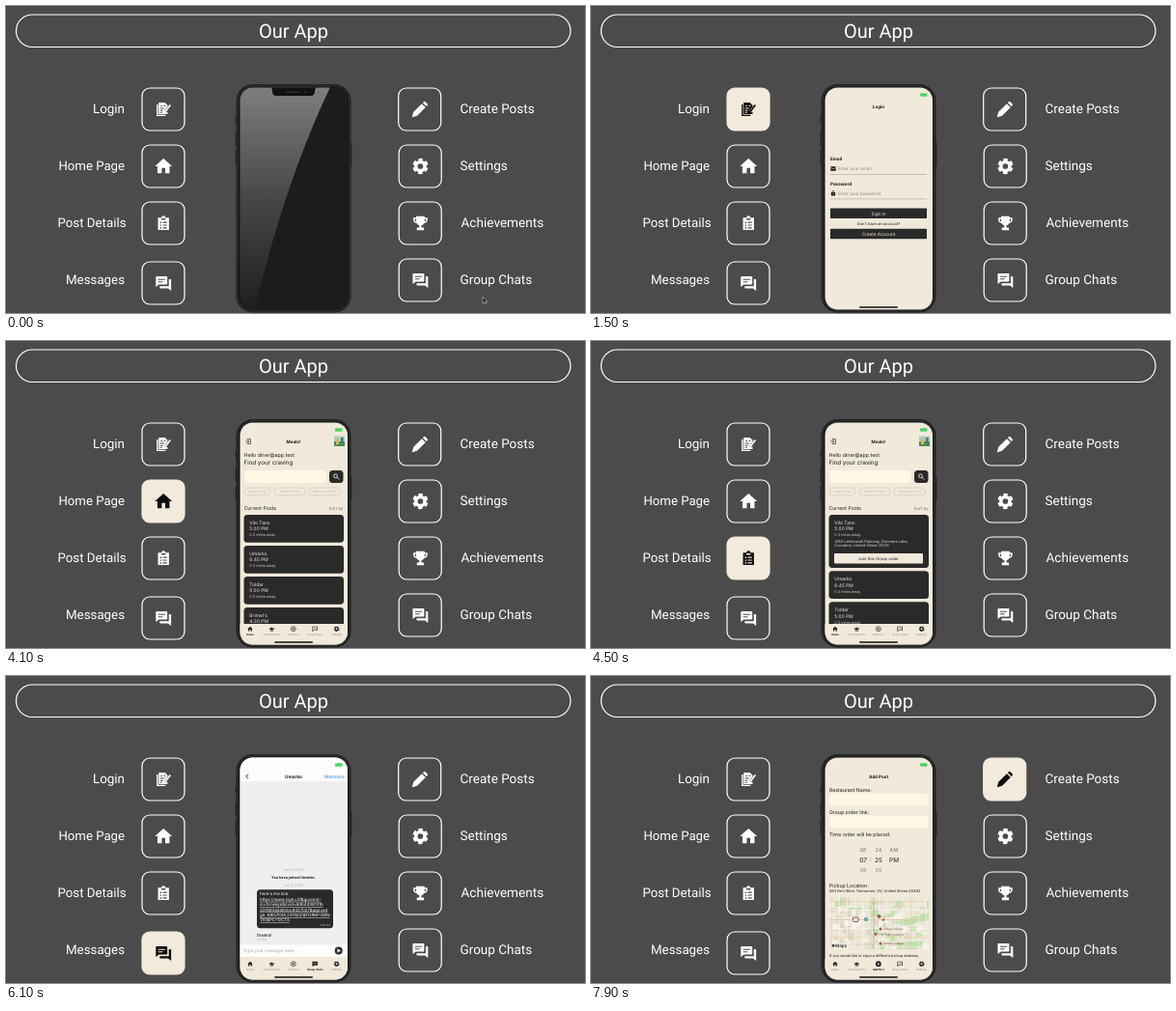
Animation of 600x318 px, one loop 8000 ms. Source, as an HTML page:

```html
<!DOCTYPE html>
<html lang="en">
<head>
<meta charset="utf-8">
<title>Our App</title>
<style>
html, body { margin: 0; width: 100%; height: 100%; overflow: hidden; background: #4b4b4b; }
svg { display: block; width: 600px; height: 318px; }
text { font-family: Inter, sans-serif; text-rendering: geometricPrecision; }
.label { font-family: Roboto, sans-serif; fill: #fff; }
.tile { color: #fff; }
.tile > rect { fill: none; stroke: #fff; stroke-width: 1.2; }
.tile.on { color: #0c0c0c; }
.tile.on > rect { fill: #f2eadb; stroke: #f2eadb; }
</style>
</head>
<body>
<svg id="stage" viewBox="0 0 600 318"></svg>
<script>
const CREAM = '#f1e9da', DARK = '#2b2a2a', FIELD = '#fdf7e4', GRAY = '#8d8a85', INK = '#1a1a1a';

const rect = (x, y, w, h, fill, r = 0, extra = '') =>
  `<rect x="${x}" y="${y}" width="${w}" height="${h}" rx="${r}" fill="${fill}" ${extra}/>`;
const circle = (x, y, r, fill, extra = '') => `<circle cx="${x}" cy="${y}" r="${r}" fill="${fill}" ${extra}/>`;
const path = (d, fill = 'none', extra = '') => `<path d="${d}" fill="${fill}" ${extra}/>`;
const text = (x, y, s, size, fill = INK, anchor = 'start', extra = '') =>
  `<text x="${x}" y="${y}" font-size="${size}" fill="${fill}" text-anchor="${anchor}" ${extra}>${s}</text>`;
const bold = (x, y, s, size, anchor = 'middle') => text(x, y, s, size, INK, anchor, 'font-weight="700"');
const label = (x, y, s, size, anchor) => text(x, y, s, size, '#fff', anchor, 'class="label"');

// Icons live in a 24 x 24 box
const solid = d => path(d, 'currentColor', 'fill-rule="evenodd"');
const icons = {
  login: solid('M2 5h2v15h11v2H2zM5 2h9l4 4v2l-4 5v3h4v3H5zM8 6v2h2V6zM12 6v1.3h3V6zM7 10v1.3h6V10zM7 13v1.3h4V13zM7 16v1.3h3V16z') +
    solid('M14 14l7-9 2 1.5-7 9-2.5 1z'),
  home: solid('M10 20v-6h4v6h5v-8h3L12 3 2 12h3v8z'),
  clipboard: solid('M4 4h5a3 3 0 0 1 6 0h5v18H4zM9 5v2h6V5zM7 10v2h2v-2zM11 10v1.6h6V10zM7 14v2h2v-2zM11 14v1.6h6V14zM7 18v2h2v-2zM11 18v1.6h6V18z'),
  chat: solid('M21 7h-2v9H7v2q0 1 1 1h10l4 3V8q0-1-1-1zM17 13V4q0-1-1-1H3Q2 3 2 4v13l4-3h10q1 0 1-1zM5 6.5h9V8H5zM5 9.7h6v1.5H5z'),
  pencil: solid('M2 22l1.8-6.5L14.5 4.8l4.7 4.7L8.5 20.2zM15.7 3.6l1.2-1.2q1-1 2 0l2.7 2.7q1 1 0 2l-1.2 1.2z'),
  gear: circle(12, 12, 5.8, 'none', 'stroke="currentColor" stroke-width="4.4"') +
    circle(12, 12, 8.6, 'none', 'stroke="currentColor" stroke-width="3.4" stroke-dasharray="5.4 3.606" transform="rotate(12 12 12)"'),
  trophy: solid('M6 2h12v2h4v3a5 5 0 0 1-4.6 5 6 6 0 0 1-3.9 3v3h3.5v4H7v-4h3.500v-3a6 6 0 0 1-3.900-3A5 5 0 0 1 2 7V4h4zM4 6v1q0 2.500 2 3V6zM20 6v1q0 2.500-2 3V6z'),
  crown: solid('M3 6l5 5 4-7 4 7 5-5-2 10H5zM6 18h12v2H6z'),
  plus: path('M12 7v10M7 12h10', 'none', 'stroke="currentColor" stroke-width="2.4"') +
    circle(12, 12, 9, 'none', 'stroke="currentColor" stroke-width="2.4"'),
  plusOn: circle(12, 12, 10.5, 'currentColor') + path('M12 7v10M7 12h10', 'none', `stroke="${CREAM}" stroke-width="2.4"`),
  bubble: solid('M2 3h20v15H8l-6 5zM4.2 5.2v12.5L7 15.8h12.8V5.2zM7 9.5h2.5V12H7zM11 9.5h2.5V12H11zM15 9.5h2.5V12H15z'),
  bubbleOn: solid('M2 3h20v15H8l-6 5zM7 9.5h2.5V12H7zM11 9.5h2.5V12H11zM15 9.5h2.5V12H15z'),
  mail: solid('M2 4h20v16H2zM3.5 6.5l8.5 6 8.5-6v2.3l-8.5 6-8.5-6z'),
  lock: solid('M4 9h3V7a5 5 0 0 1 10 0v2h3v13H4zM9 9h6V7a3 3 0 0 0-6 0zM10.5 14v3h3v-3z'),
  exit: path('M9 7V3h12v18H9v-4M2 12h13M11 8l4 4-4 4', 'none', 'stroke="currentColor" stroke-width="2.4"')
};
const icon = (name, cx, cy, size, color) =>
  `<g transform="translate(${cx - size / 2} ${cy - size / 2}) scale(${size / 24})"${color ? ` color="${color}"` : ''}>${icons[name]}</g>`;

const tile = (x, y, name, size) =>
  `<g class="tile">${rect(x, y, 44, 44, '', 8)}${icon(name, x + 22.2, y + 22, size)}</g>`;

const statusBar = () => text(251, 94, '9:41', 4, '#fbf6ec') + rect(341, 90.2, 7.5, 3.6, '#4cd667', 1.2);
const homeBar = () => rect(278, 311.2, 40, 1.5, '#111', .75);

function tabBar(active) {
  const tabs = [['home', 'Home'], ['crown', 'Achievements'], ['plus', 'Add Post'], ['bubble', 'Group Chats'], ['gear', 'Settings']];
  return rect(242, 293, 113, 23, CREAM) + tabs.map(([name, caption], i) => {
    const x = 253 + i * 22.4, on = i === active;
    return icon(on && icons[name + 'On'] ? name + 'On' : name, x, 298.2, 6.6, '#222') +
      text(x, 304.7, caption, 2.7, on ? '#111' : '#8a857c', 'middle', on ? 'font-weight="700"' : '');
  }).join('') + homeBar();
}

function loginScreen() {
  const field = (y, title, name, hint) => bold(248, y, title, 4.6, 'start') + icon(name, 251, y + 8.2, 6.4, INK) +
    text(255.5, y + 10, hint, 4.6, GRAY) + rect(248, y + 14, 100, .6, '#a7a5a8');
  const button = (y, s) => rect(248, y, 100, 10.6, DARK, .8) + text(298, y + 7, s, 4.7, CREAM, 'middle');
  return statusBar() + bold(298, 105.6, 'Login', 4.6) +
    field(160.3, 'Email', 'mail', 'Enter your email') + field(185.6, 'Password', 'lock', 'Enter your password') +
    button(209.5, 'Sign in') + text(298, 226.7, "Don't have an account?", 4, INK, 'middle') +
    button(230.7, 'Create Account') + homeBar();
}

const posts = [['Vilo Tano', '5:00 PM'], ['Umarko', '6:45 PM'], ['Toldar', '5:00 PM'], ["Brimel's", '4:30 PM']];

function feedScreen(open) {
  let y = 180, cards = '';
  posts.forEach(([name, time], i) => {
    const wide = open && i === 0, h = wide ? 55 : 28.8;
    cards += rect(246.5, y, 103.5, h, DARK, 3.5) + text(252.3, y + 9.7, name, 4.9, '#eee7da') +
      text(252.3, y + 16.3, time, 4.9, '#eee7da') + text(252.3, y + 22.3, '0.3 miles away', 3.9, '#d3ccc0');
    if (wide) cards += text(252.3, y + 28.5, '4180 Larkenwell Parkway, Dunmere Lake,', 3.9, '#e4ddd0') +
      text(252.3, y + 33.2, 'Corvaline, United Shires 70218', 3.9, '#e4ddd0') +
      rect(252, y + 40, 92, 10.6, CREAM, 1) + text(298, y + 46.9, 'Join this Group order', 4.2, INK, 'middle');
    y += h + 3.2;
  });
  const chip = (x, w, s) => rect(x, 152, w, 7.6, 'none', 3.8, 'stroke="#cfc6b6" stroke-width=".6"') +
    text(x + w / 2, 157, s, 3.5, '#c4baa9', 'middle');
  const avatar = rect(340, 98.5, 11, 10.5, '#a9cfc4') + rect(340, 104, 11, 5, '#4d8a55') +
    rect(342, 101, 3, 6, '#d9b765') + rect(347, 100, 2.5, 6, '#3c7b8c');
  return statusBar() + icon('exit', 251, 104, 6.5, INK) + bold(298, 105.6, 'Meals!', 4.5) + avatar +
    text(246.5, 120, 'Hello diner@app.test', 5.3) + text(246.5, 128, 'Find your craving', 6.2) +
    rect(247, 134, 84.5, 13, FIELD, 3.5) + rect(335, 134, 14.5, 13, DARK, 3.5) +
    circle(341.5, 139.8, 1.9, 'none', 'stroke="#fff" stroke-width=".8"') +
    path('M343 141.3l2.2 2.2', 'none', 'stroke="#fff" stroke-width=".9"') +
    chip(247, 27, 'Asian Food') + chip(278, 32, 'Korean Food') + chip(313.5, 33, 'Mexican Food') +
    text(246.5, 175, 'Current Posts', 5.2) + text(349.5, 174.8, 'Sort by', 4.4, '#77747c', 'end') + cards + tabBar(0);
}

function chatScreen() {
  const link = ['https://www.zigh=41&amp;guomot-', 'in=forways&amp;cvid=6db4436131b', '431983a5a8cbc9427027&amp;aqs=ed',
    'ge..69i57l0l8.2319j0j1&amp;FORM=ANN', 'TA1&amp;PC=DCTS'];
  return rect(242, 84, 113, 25, '#fdfdfd') + rect(242, 109, 113, 170, '#efeff0') + rect(242, 278.5, 113, 13, '#fdfdfd') +
    rect(242, 291, 113, 3, CREAM) + statusBar() + path('M251 101.6l-2.2 2.3 2.2 2.3', 'none', 'stroke="#111" stroke-width=".9"') +
    bold(298, 105.6, 'Umarko', 4.7) + text(351, 105.6, 'Members', 4.7, '#2783d6', 'end') +
    text(298, 201.5, 'Jul 13, 2023', 3.5, '#aaa', 'middle') + bold(298, 210, 'You have joined Umarko.', 3.8) +
    text(298, 218, 'Jul 17, 2023', 3.5, '#aaa', 'middle') + rect(260, 221.3, 79, 40, DARK, 3.5) +
    text(263, 227.4, "here's the link:", 4.4, '#fff') +
    link.map((s, i) => text(263, 232.8 + i * 5.4, s, 4.4, '#fff', 'start', 'text-decoration="underline"')).join('') +
    text(336, 259.3, '5:50 PM', 2.7, '#bbb', 'end') + text(260, 269.6, 'thanks!', 4.4, INK, 'start', 'font-weight="500"') +
    text(260, 274, '5:51 PM', 2.7, '#aaa') + text(245.5, 285.7, 'Type your message here...', 4.5, '#a5a5a8') +
    circle(344.7, 284.5, 4, DARK) + path('M343 282.5l4.2 2-4.2 2 .5-2z', '#fff') + tabBar(3);
}

function map() {
  let seed = 7;
  const random = () => (seed = seed * 16807 % 2147483647) / 2147483647;
  let s = rect(247, 229, 103, 54, '#ece7d8');
  for (let i = 0; i < 110; i++) {
    const x = 247 + random() * 103, green = random() < (x > 300 ? .6 : .25);
    s += rect(x, 229 + random() * 54, 2 + random() * 8, 2 + random() * 6, green ? '#bfe0a9' : random() < .5 ? '#e0d8c6' : '#f5f1e8');
  }
  for (let i = 0; i < 13; i++) s += rect(249 + i * 8.2, 229, .6, 54, i % 5 ? '#faf8f2' : '#e6cf9f');
  for (let i = 0; i < 6; i++) s += rect(247, 233 + i * 9.4, 103, .6, i % 4 ? '#faf8f2' : '#e3c896');
  s += rect(247, 252, 103, .9, '#d9c7a5') + rect(292.5, 229, .9, 54, '#b9b0a2');
  s += rect(271.5, 250, 5.5, 4.5, '#efe5d4', 1, 'stroke="#8b5a4d" stroke-width="1"') + circle(285, 252, 2.2, '#6fa79b');
  [[298.5, 249, 2], [303, 252.5, 1.3], [300, 262, 1.5], [295, 267.5, 1.4], [300, 277, 1.5]].forEach(p =>
    s += circle(...p, '#9a5a4c'));
  [[303, 263, 'Village College'], [298, 268.5, 'The Town Colleges'], [303, 278, 'Garden College']].forEach(p =>
    s += text(...p, 2.9, '#7a4b40'));
  return `<g clip-path="url(#mapArea)">${s}</g>` + circle(251, 279.3, 1.4, '#333') + text(253, 281, 'Maps', 4.6, '#333', 'start', 'font-weight="600"');
}

function addScreen() {
  const picker = (y, values, size, fill) => values.map((s, i) => text(282 + i * 16, y, s, size, fill, 'middle')).join('');
  return statusBar() + bold(298, 105.6, 'Add Post', 4.6) +
    text(247, 119.6, 'Restaurant Name:', 5.2) + rect(247, 121.5, 102.5, 13, FIELD, 3.5) +
    text(247, 142.6, 'Group order link:', 5.2) + rect(247, 144.5, 102.5, 13, FIELD, 3.5) +
    text(247, 166.2, 'Time order will be placed:', 5.2) +
    picker(181.7, ['06', '24', 'AM'], 5.5, '#77726a') + picker(192.6, ['07', '25', 'PM'], 6.5, INK) +
    text(290, 192.2, ':', 6.5, INK, 'middle') + picker(203.2, ['08', '26'], 5.5, '#8d877d') +
    text(247, 218.6, 'Pickup Location:', 5.2) + text(247, 224, '583 Fern Blvd, Tolmerrow, OV, United Shires 60482', 3.9) +
    map() + text(247, 290.6, 'If you would like to input a different pickup address,', 3.8) + tabBar(2);
}

const idleScreen = () => rect(242, 84, 113, 232, '#1d1b1c') +
  path('M242 84H336Q290 180 257 316H242z', 'url(#glare)') +
  path('M274 84h48q-2 1-2 4 0 5-4 5h-36q-4 0-4-5 0-3-2-4z', '#111') +
  rect(290, 88.4, 15, 1.4, '#333', .7) + circle(310, 89, 1.2, '#26282c');

const screens = [idleScreen(), loginScreen(), feedScreen(false), feedScreen(true), chatScreen(), addScreen()];

const stage = document.getElementById('stage');
stage.innerHTML = `<defs>
  <linearGradient id="glare" x1="0" y1="0" x2="0" y2="1">
    <stop stop-color="#7e7e7e"/><stop offset=".5" stop-color="#484747"/><stop offset="1" stop-color="#1f1d1e"/></linearGradient>
  <clipPath id="screenArea">${rect(242.5, 84.5, 111.5, 230, '#000', 13)}</clipPath>
  <clipPath id="mapArea">${rect(247, 229, 103, 54, '#000')}</clipPath></defs>` +
  rect(0, 0, 600, 318, '#4b4b4b') +
  rect(10.5, 9, 574.5, 33.5, 'none', 16.7, 'stroke="#fff" stroke-width="1.2"') + label(298, 33.2, 'Our App', 20, 'middle') +
  label(123, 111, 'Login', 13.4, 'end') + label(123, 170, 'Home Page', 13.2, 'end') +
  label(124.5, 229, 'Post Details', 13.3, 'end') + label(123, 288, 'Messages', 13.3, 'end') +
  label(470.5, 111, 'Create Posts', 13.5) + label(470.5, 170, 'Settings', 13.5) +
  label(471.5, 229, 'Achievements', 13.6) + label(470.5, 288, 'Group Chats', 13.5) +
  tile(141, 85, 'login', 17) + tile(141, 144, 'home', 21.5) + tile(141, 203, 'clipboard', 17) + tile(141, 265, 'chat', 19) +
  tile(406.7, 85, 'pencil', 19.5) + tile(407.2, 144, 'gear', 19) + tile(407.2, 203, 'trophy', 17.5) + tile(407.2, 262, 'chat', 19) +
  rect(237.6, 131, 2, 14, '#2b2b2b', .6) + rect(237.6, 150, 2, 14, '#2b2b2b', .6) + rect(237.6, 114, 2, 7, '#2b2b2b', .6) +
  rect(356.5, 141, 2, 25, '#2b2b2b', .6) +
  rect(239, 81.6, 118, 235.4, '#131313', 16.5, 'stroke="#222" stroke-width="1"') +
  rect(240.2, 82.8, 115.6, 233, 'none', 15.300, 'stroke="#454545" stroke-width=".8"') +
  screens.map((s, i) => `<g class="screen" clip-path="url(#screenArea)">${i ? rect(242, 84, 113, 232, CREAM) : ''}${s}</g>`).join('') +
  `<g id="cursor">${path('M0 0v6.4l1.5-1.2 1 2.2 1.2-.5-1-2.2h2z', '#111', 'stroke="#d8d8d8" stroke-width=".6"')}</g>`;

const screenNodes = stage.querySelectorAll('.screen');
const tileNodes = stage.querySelectorAll('.tile');
const cursor = document.getElementById('cursor');
const starts = [0, 1200, 3100, 4500, 5800, 7400];

function draw(now) {
  const time = now % 8000;
  const current = starts.filter(start => start <= time).length - 1;
  screenNodes.forEach((node, i) => node.style.display = i === current ? '' : 'none');
  tileNodes.forEach((node, i) => node.classList.toggle('on', i === current - 1));
  cursor.style.display = time < 400 ? '' : 'none';
  cursor.setAttribute('transform', time < 300 ? 'translate(494 301.5)' : 'translate(492 311.5)');
  requestAnimationFrame(draw);
}
draw(0);
</script>
</body>
</html>
```
